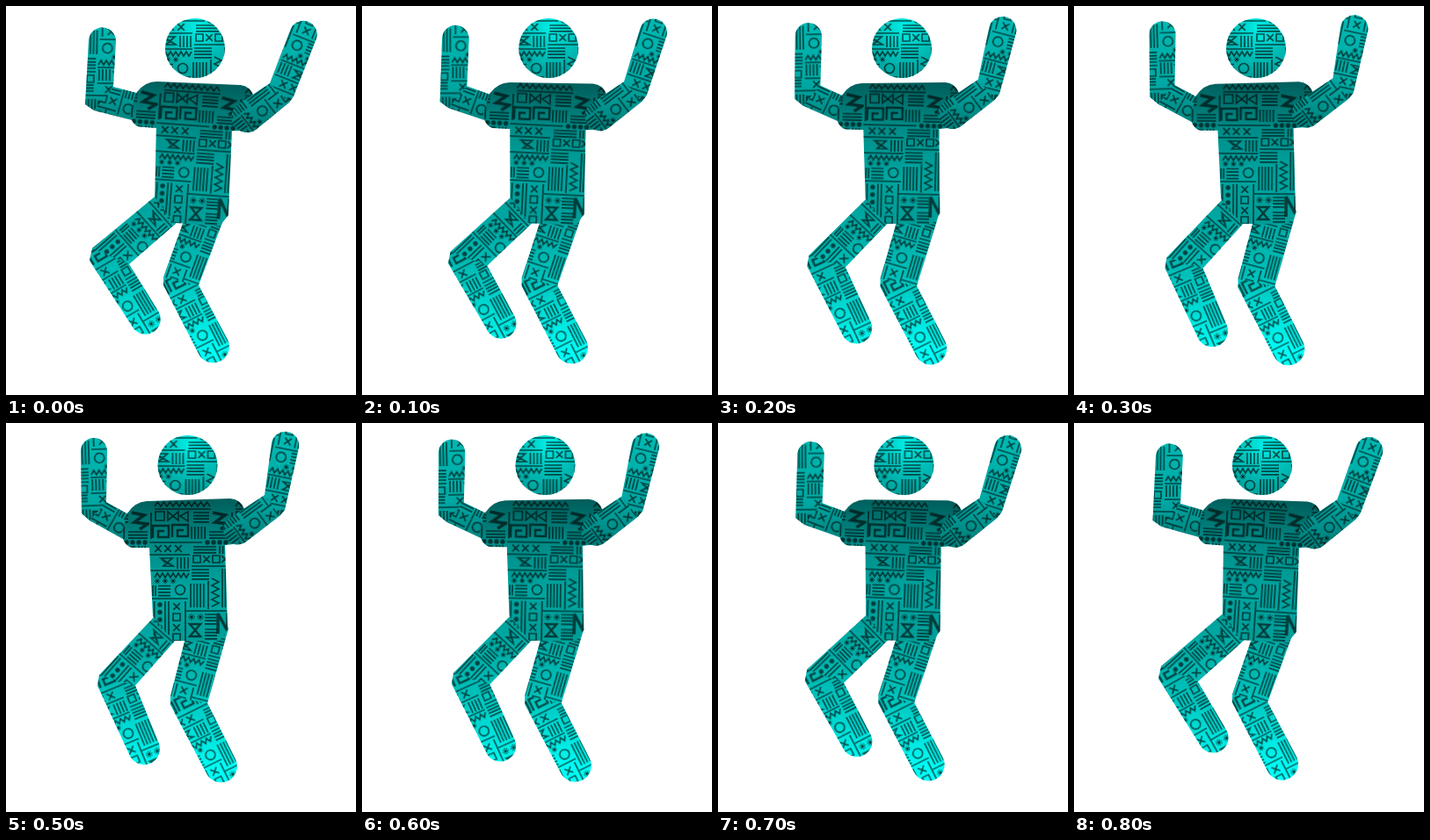
An HTML page that plays this animation: 398 px wide and 443 px high, repeating every 900 ms.

```html
<!DOCTYPE html>
<html lang="en">
<head>
<meta charset="utf-8">
<title>Dancing figure</title>
<style>
html, body { margin: 0; width: 100%; height: 100%; overflow: hidden; background: #fff; }
svg { display: block; width: 100vw; height: 100vh; }
</style>
</head>
<body>
<svg id="stage" viewBox="0 0 398 443" preserveAspectRatio="none">
  <defs>
    <linearGradient id="legFill" gradientUnits="userSpaceOnUse" x1="0" y1="220" x2="0" y2="395">
      <stop offset="0" stop-color="#00a09b"/>
      <stop offset=".5" stop-color="#00c0ba"/>
      <stop offset="1" stop-color="#00fff8"/>
    </linearGradient>
    <linearGradient id="armFill" gradientUnits="userSpaceOnUse" x1="0" y1="12" x2="0" y2="140">
      <stop offset="0" stop-color="#00bab4"/>
      <stop offset=".6" stop-color="#00a8a3"/>
      <stop offset="1" stop-color="#007d79"/>
    </linearGradient>
    <linearGradient id="bodyFill" gradientUnits="userSpaceOnUse" x1="0" y1="88" x2="0" y2="248">
      <stop offset="0" stop-color="#005f5c"/>
      <stop offset=".3" stop-color="#008a86"/>
      <stop offset=".65" stop-color="#00a5a0"/>
      <stop offset="1" stop-color="#009d98"/>
    </linearGradient>
    <radialGradient id="headFill" cx=".55" cy=".15" r=".85">
      <stop offset="0" stop-color="#00f0e8"/>
      <stop offset=".5" stop-color="#00c2bc"/>
      <stop offset="1" stop-color="#00a19c"/>
    </radialGradient>
    <pattern id="cloth" patternUnits="userSpaceOnUse" width="92" height="162">
      <g id="marks" fill="none" stroke="#000" stroke-opacity=".62" stroke-width="1.7"></g>
    </pattern>
  </defs>
</svg>
<script>
const NS = 'http://www.w3.org/2000/svg';
const STEP = 100;
// Lean from right (0) to left (1), one value per step.
const SWAY = [0, .33, .7, .94, 1.03, 1, .77, .42, .12];
const stage = document.getElementById('stage');
const defs = stage.querySelector('defs');

function add(parent, tag, attrs) {
  const el = document.createElementNS(NS, tag);
  for (const k in attrs) el.setAttribute(k, attrs[k]);
  return parent.appendChild(el);
}

// Cloth motifs, each returning path data
const rows = (x, y, w, n, gap) =>
  Array.from({ length: n }, (_, i) => `M${x},${y + i * gap}h${w}`).join('');
const cols = (x, y, h, n, gap) =>
  Array.from({ length: n }, (_, i) => `M${x + i * gap},${y}v${h}`).join('');
const cross = (x, y, r = 3.8) => `M${x - r},${y - r}l${2 * r},${2 * r}m0,${-2 * r}l${-2 * r},${2 * r}`;
const star = (x, y, r) => cross(x, y, r * .7) + `M${x - r},${y}h${2 * r}M${x},${y - r}v${2 * r}`;
const box = (x, y, r = 4) => `M${x - r},${y - r}h${2 * r}v${2 * r}h${-2 * r}z`;
const bow = (x, y) => `M${x - 6},${y - 5}v10l12,-10v10z`;
const zig = (x, y, dx, dy, n, upright) => {
  let d = `M${x},${y}`;
  for (let i = 0; i < n; i++) {
    const s = i % 2 ? -dy : dy;
    d += upright ? `l${s},${dx}` : `l${dx},${s}`;
  }
  return d;
};
const coil = (x, y) => `M${x},${y + 14}v-14h18v13h-12v-7h7`;

function drawCloth() {
  const g = document.getElementById('marks');
  const thin = [
    star(9, 92, 3.2), star(18, 92, 3.2), star(27, 92, 3.2),
    star(48, 133, 4), star(58, 133, 4)
  ];
  const medium = [
    zig(6, 7, 3.5, -5, 18), rows(6, 10, 64, 1, 0),
    box(12, 18, 5), bow(27, 18), 'M44,13v11l-9,-6z',
    rows(50, 14, 18, 4, 3.6), cols(48, 30, 14, 5, 3.8),
    rows(68, 36, 22, 3, 3.6), rows(0, 48, 60, 1, 0), cols(2, 14, 30, 1, 0),
    cross(10, 55), cross(21, 55), cross(33, 55), rows(0, 62, 46, 1, 0),
    'M13,66h13l-10,9h11zM13,66l5,5', cols(32, 65, 13, 4, 4),
    rows(50, 53, 26, 3, 3.4), cols(80, 52, 9, 3, 3.6),
    box(54, 67), cross(65, 67), box(76, 67), cross(86, 67),
    rows(0, 80, 46, 1, 0), zig(6, 88, 3, -5, 13),
    rows(10, 97.5, 14, 4, 3.7), cols(4, 97, 12, 2, 3),
    rows(48, 75, 42, 1, 0), rows(48, 79, 20, 4, 3.6), cols(47, 95, 27, 5, 3.7),
    cols(67, 92, 32, 1, 0), zig(71, 89, 4, 8, 8, true), cols(83, 78, 44, 3, 3.5),
    rows(0, 112, 44, 1, 0), cols(18, 115, 38, 2, 4),
    cross(31, 121), box(31, 133), cross(31, 145), box(31, 156),
    cols(41, 115, 45, 1, 0), rows(42, 126, 48, 1, 0),
    rows(63, 130, 13, 4, 3.6), rows(63, 147, 14, 4, 3.6),
    cols(2, 115, 42, 2, 3.6)
  ];
  const bold = [
    coil(4, 29), coil(26, 28), 'M46,141h12l-12,14h12z'
  ];
  const heavy = 'M72,14l14,3l-11,8l15,2l-9,6M78,152v-23l11,20v-21';
  const stroke = (d, w) => add(g, 'path', { d, 'stroke-width': w });
  stroke(thin.join(''), 1);
  stroke(medium.join(''), 1.7);
  stroke(bold.join(''), 2.5);
  stroke(heavy, 3.6);
  add(g, 'circle', { cx: 35, cy: 102, r: 5.5 });
  const dot = (cx, cy) => add(g, 'circle', { cx, cy, r: 2.7, fill: '#000', 'fill-opacity': .62, stroke: 'none' });
  for (let i = 0; i < 4; i++) {
    dot(66 + i * 7, 48);
    dot(12, 119 + i * 8.5);
  }
}

let clothCount = 0;
function newCloth() {
  const id = 'cloth' + clothCount++;
  return add(defs, 'pattern', { id, href: '#cloth' });
}
const useCloth = (el) => `url(#${el.id})`;

// Outline order: root, two joint corners, two tip ends, inner joint, root.
// upper and lower are the cloth points pinned to the joint and the tip.
const leftArm = { fill: 'armFill', sweep: 1, upper: [30, 135], lower: [41, 110],
  a: [[160,134],[100,119],[90,112],[94,40],[125,40],[122,92],[160,102]],
  b: [[140,136],[95,111],[86,103],[85,32],[115,32],[114,90],[150,110]] };
const rightArm = { fill: 'armFill', sweep: 0, upper: [40, 132], lower: [33, 116],
  a: [[284,141],[322,110],[327,103],[353,37],[323,28],[300,88],[264,112]],
  b: [[272,136],[311,106],[317,99],[333,28],[302,23],[294,82],[255,108]] };
const leftLeg = { fill: 'legFill', sweep: 0, upper: [21, 139], lower: [45, 125],
  a: [[168,218],[98,276],[95,290],[143,364],[174,349],[140,294],[194,247]],
  b: [[170,219],[106,287],[104,299],[140,377],[174,365],[147,299],[193,247]] };
const rightLeg = { fill: 'legFill', sweep: 0, upper: [40, 132], lower: [40, 119],
  a: [[202,245],[179,309],[179,318],[219,396],[252,380],[219,318],[250,236]],
  b: [[204,245],[187,311],[187,321],[228,399],[261,383],[229,319],[253,234]] };
const limbs = [leftArm, leftLeg, rightLeg, rightArm];

const mix = (a, b, p) => a + (b - a) * p;
const mid = (a, b) => [(a[0] + b[0]) / 2, (a[1] + b[1]) / 2];
const gap = (a, b) => Math.hypot(b[0] - a[0], b[1] - a[1]);

// Pins a cloth point to the far end of a bone, turned to run along it.
function pin(cloth, from, to, point) {
  const turn = Math.atan2(from[0] - to[0], to[1] - from[1]) * 180 / Math.PI;
  cloth.setAttribute('patternTransform',
    `translate(${to}) rotate(${turn}) translate(${-point[0]},${-point[1]})`);
}

function buildLimb(limb) {
  limb.base = add(stage, 'path', { fill: `url(#${limb.fill})` });
  for (const part of ['Upper', 'Lower']) {
    limb['cloth' + part] = newCloth();
    limb['path' + part] = add(stage, 'path', { fill: useCloth(limb['cloth' + part]) });
  }
}

function poseLimb(limb, p) {
  const pts = limb.a.map((q, i) => [mix(q[0], limb.b[i][0], p), mix(q[1], limb.b[i][1], p)]);
  const [r1, k1, k2, t1, t2, k3, r2] = pts;
  const cap = (from, to) => {
    const r = gap(from, to) / 2;
    return `L${from}A${r},${r} 0 0 ${limb.sweep} ${to}`;
  };
  const end = `L${k2}${cap(t1, t2)}L${k3}`;
  limb.base.setAttribute('d', `M${r1}L${k1}${end}${cap(r2, r1)}Z`);
  limb.pathUpper.setAttribute('d', `M${r1}L${k1}L${k3}${cap(r2, r1)}Z`);
  limb.pathLower.setAttribute('d', `M${k1}${end}Z`);
  const root = mid(r1, r2), joint = mid(mid(k1, k2), k3), tip = mid(t1, t2);
  pin(limb.clothUpper, root, joint, limb.upper);
  pin(limb.clothLower, joint, tip, limb.lower);
}

function buildBody() {
  const g = add(stage, 'g', {});
  const d = 'M160,89L255,86Q266,87 270,96L278,114Q281,134 268,137L249,139L252,235L243,248H190' +
    'L167,220L163,142L143,142Q132,138 132,124L138,103Q146,90 160,89Z';
  const cloth = newCloth();
  cloth.setAttribute('patternTransform', 'translate(163,88)');
  for (const fill of ['url(#bodyFill)', useCloth(cloth)]) add(g, 'path', { d, fill });
  return g;
}

function buildHead() {
  const g = add(stage, 'g', {});
  const cloth = newCloth();
  cloth.setAttribute('patternTransform', 'translate(-49,-79)');
  for (const fill of ['url(#headFill)', useCloth(cloth)]) add(g, 'circle', { r: 34, fill });
  return g;
}

drawCloth();
[leftArm, leftLeg, rightLeg].forEach(buildLimb);
const body = buildBody();
buildLimb(rightArm);
const head = buildHead();

function draw(t) {
  const p = SWAY[Math.floor(t / STEP) % SWAY.length];
  limbs.forEach(limb => poseLimb(limb, p));
  body.setAttribute('transform', `rotate(${4.2 * (1 - p)} 207 248)`);
  head.setAttribute('transform', `translate(${mix(215, 206.5, p)},48)`);
}

const start = performance.now();
function tick() {
  draw(performance.now() - start);
  requestAnimationFrame(tick);
}
tick();
</script>
</body>
</html>
```
